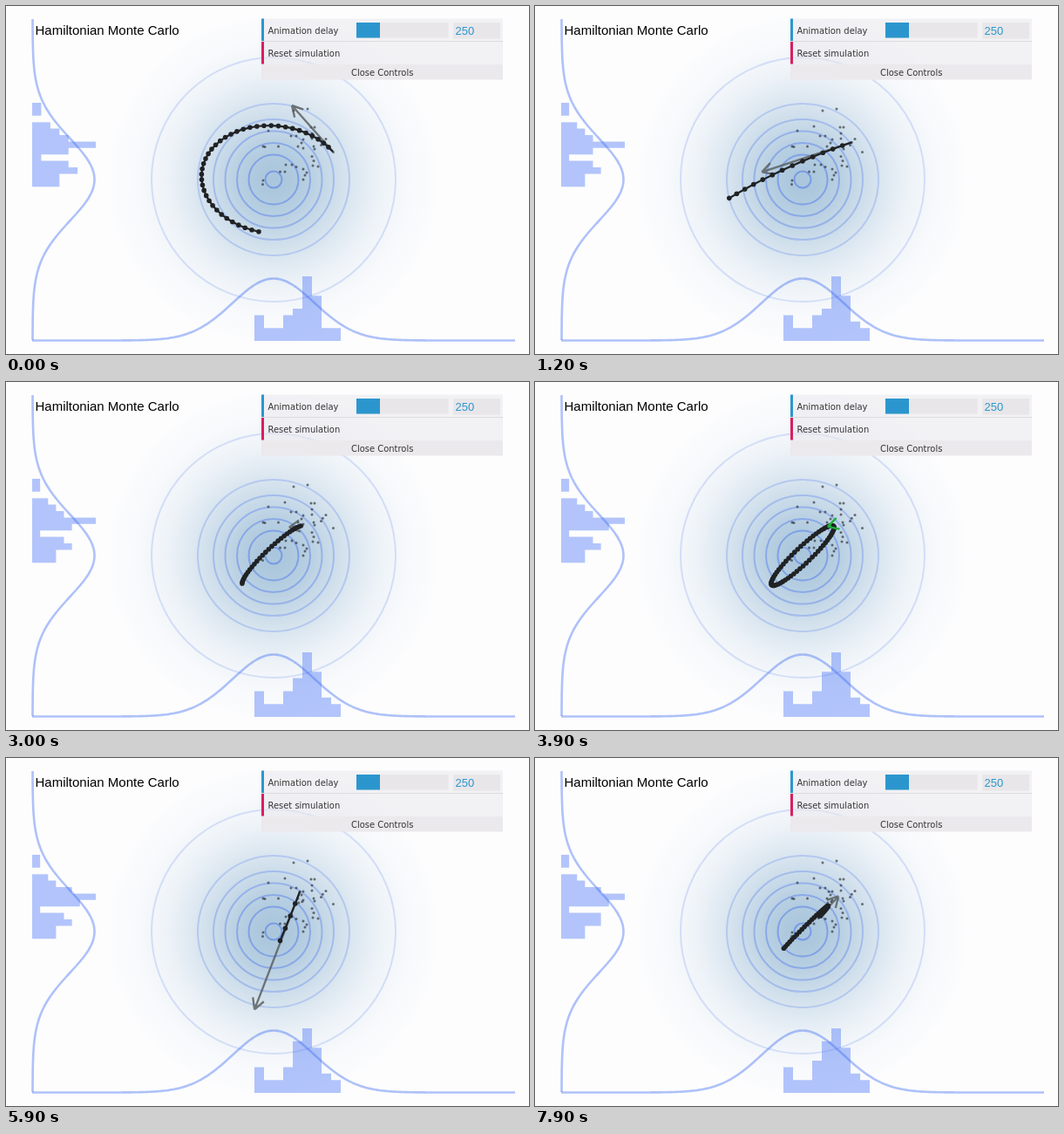
An HTML page with a canvas for the animation above (8000 ms loop, 600 px wide and 399 px high).

```html
<!DOCTYPE html>
<html>
<head>
<meta charset="utf-8">
<style>
html, body { margin: 0; width: 600px; height: 399px; overflow: hidden; background: #fdfdfe; }
canvas { display: block; }
</style>
</head>
<body>
<canvas id="stage" width="600" height="399"></canvas>
<script>
const ctx = document.getElementById('stage').getContext('2d');
const LOOP = 8000, STEPS = 65, DT = 0.1, RATE = 0.06;   // leapfrog steps per ms
const SETTLE = 100, LEAD = 200;
const CX = 307, CY = 199, SIGMA = 47;

// earlier samples in stage coordinates
const samples = [
  346,118, 330,120, 320,138, 354,139, 301,143, 351,146, 350,139, 327,149, 333,149,
  367,152.5, 351,152, 341,153, 339,157, 295,161, 297,161.5, 312.5,161, 335,161, 353,161,
  375.5,167.5, 354,164, 361.5,159.5, 341,163, 351,172.5, 353,177.5, 352,183, 328,182,
  321,182, 358,184, 333,184.5, 320,190, 314.5,190, 341,187, 345,191, 343,194, 341,199,
  295,200, 294.5,204.5
];
const xBase = [4, 2, 2, 4, 5, 10, 7, 2, 2];
const yBase = [1, 1, 0, 2, 3, 4, 7, 4, 1, 4, 5, 3, 3];

// start time and initial momentum of each trajectory; positions chain on
const runs = [
  [-650, -47, -53], [975, -103, 34], [2542, -15, 2],
  [4142, 9, -62], [5825, -52, 135], [7342, 23, -25]
].map(([start, px, py]) => ({ start, px, py }));

function at(run, a) {
  const c = Math.cos(a), s = Math.sin(a);
  return [run.x * c + run.px * s, run.y * c + run.py * s];
}

let q = [68, -32];
for (const run of runs) {
  [run.x, run.y] = q;
  run.end = q = at(run, STEPS * DT);
  run.accept = run.start + STEPS / RATE + SETTLE;
}

function circle(x, y, r) {
  ctx.beginPath();
  ctx.arc(x, y, r, 0, 7);
}

function dot(x, y, r) {
  circle(x, y, r);
  ctx.fill();
}

function arrow(x0, y0, x1, y1, color) {
  const back = Math.atan2(y0 - y1, x0 - x1);
  ctx.strokeStyle = color;
  ctx.lineWidth = 2.4;
  ctx.beginPath();
  ctx.moveTo(x0, y0);
  ctx.lineTo(x1, y1);
  for (const side of [-0.5, 0.5]) {
    ctx.moveTo(x1, y1);
    ctx.lineTo(x1 + 14 * Math.cos(back + side), y1 + 14 * Math.sin(back + side));
  }
  ctx.stroke();
}

function box(x, y, w, h, color) {
  ctx.fillStyle = color;
  ctx.fillRect(x, y, w, h);
}

function text(str, x, y, font, color) {
  ctx.font = font;
  ctx.fillStyle = color;
  ctx.fillText(str, x, y);
}

function drawTarget() {
  box(0, 0, 600, 399, '#fdfdfe');
  const glow = ctx.createRadialGradient(CX, CY, 0, CX, CY, 190);
  for (let i = 0; i <= 20; i++) {
    const r = i * 9.5, a = i < 20 ? 0.62 * Math.exp(-r * r / 2 / 68 ** 2) : 0;
    glow.addColorStop(i / 20, `rgba(120,165,200,${a})`);
  }
  box(0, 0, 600, 399, glow);
  ctx.lineWidth = 2;
  [9.5, 28.5, 42, 55.5, 69, 87, 140].forEach((r, i) => {
    ctx.strokeStyle = `rgba(80,120,235,${0.56 - 0.06 * i})`;
    circle(CX, CY, r);
    ctx.stroke();
  });
}

function drawMarginals(xs, ys) {
  const xUnit = 74 / Math.max(...xs), yUnit = 73 / Math.max(...ys);
  ctx.fillStyle = 'rgba(65,110,245,0.4)';
  ctx.beginPath();
  xs.forEach((n, i) => ctx.rect(285 + 11 * i, 384 - n * xUnit, 11, n * xUnit));
  ys.forEach((n, i) => ctx.rect(30, 111 + 7.4 * i, n * yUnit, 7.4));
  ctx.fill();

  const bell = d => 71 * Math.exp(-d * d / 2 / SIGMA ** 2);
  ctx.strokeStyle = 'rgba(65,110,240,0.42)';
  ctx.lineWidth = 2.6;
  ctx.beginPath();
  for (let x = 30; x <= 584; x += 2) ctx.lineTo(x, 383.5 - bell(x - CX));
  ctx.stroke();
  ctx.beginPath();
  for (let y = 15; y <= 384; y += 2) ctx.lineTo(30.5 + bell(y - CY), y);
  ctx.stroke();
}

function drawRun(run, t) {
  const x0 = CX + run.x, y0 = CY + run.y;
  const done = t >= run.accept;
  if (!done) arrow(x0, y0, x0 + run.px, y0 + run.py, 'rgba(85,90,90,0.8)');

  const n = Math.max(0, Math.min(STEPS, Math.floor((t - run.start) * RATE)));
  ctx.strokeStyle = ctx.fillStyle = '#202224';
  ctx.lineWidth = 2.2;
  ctx.beginPath();
  const path = [];
  for (let i = 0; i <= n; i++) {
    const [x, y] = at(run, i * DT);
    path.push([CX + x, CY + y]);
    ctx.lineTo(CX + x, CY + y);
  }
  ctx.stroke();
  for (const [x, y] of path.slice(1)) dot(x, y, 2.8);

  if (done) arrow(x0, y0, CX + run.end[0], CY + run.end[1], '#22b03c');
}

function drawPanel() {
  const label = '9.95px "DejaVu Sans", sans-serif';
  const row = 'rgba(236,234,238,0.6)', field = '#e8e6e9';
  box(293, 14.5, 277, 25.5, row);
  box(293, 40, 277, 1, '#dddbde');
  box(293, 41, 277, 25.5, row);
  box(293, 66.5, 277, 18, '#ebe9ec');
  box(293, 14.5, 3, 25.5, '#2b96cd');
  box(293, 41, 3, 25.5, '#d81e5f');
  box(402, 19, 105.5, 17.5, field);
  box(402, 19, 27, 17.5, '#2b96cd');
  box(513, 19, 54, 18.5, field);
  text('Animation delay', 300.5, 31.5, label, '#333');
  text('Reset simulation', 300.5, 57.5, label, '#333');
  text('Close Controls', 396, 79.5, label, '#333');
  text('250', 515.5, 32.5, '13px "Liberation Sans", Arial, sans-serif', '#2b96cd');
}

function draw(t) {
  const xs = [...xBase], ys = [...yBase], points = [...samples];
  for (const run of runs) {
    if (t < run.accept) continue;
    const x = CX + run.end[0], y = CY + run.end[1];
    points.push(x, y);
    xs[Math.floor((x - 285) / 11)]++;
    ys[Math.floor((y - 111) / 7.4)]++;
  }
  drawTarget();
  drawMarginals(xs, ys);
  ctx.fillStyle = 'rgba(40,45,50,0.65)';
  for (let i = 0; i < points.length; i += 2) dot(points[i], points[i + 1], 1.5);
  drawRun(runs.filter(run => t >= run.start - LEAD).pop(), t);
  text('Hamiltonian Monte Carlo', 33.5, 32.5, '15px "Liberation Sans", Arial, sans-serif', '#000');
  drawPanel();
}

function frame() {
  const t = performance.now() % LOOP;
  draw(Math.floor(t / 100) * 100);
  requestAnimationFrame(frame);
}
frame();
</script>
</body>
</html>
```
